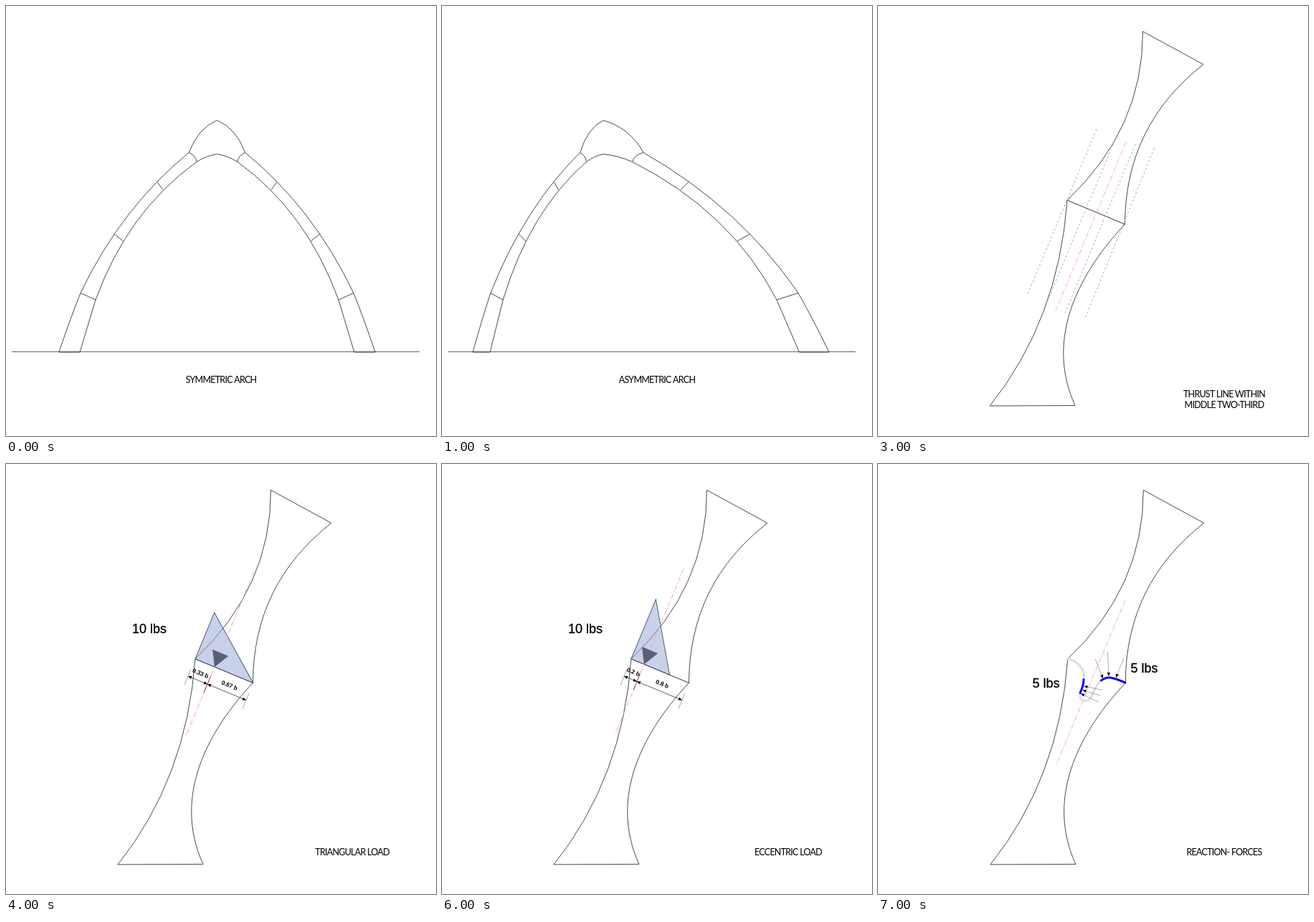
Recreate the animation shown at these times as an HTML page with a canvas. Size 600 by 600 pixels, loop 8000 ms.

```html
<!DOCTYPE html>
<html lang="en">
<head>
<meta charset="utf-8">
<title>Arch joints</title>
<style>
  html, body { margin: 0; width: 100%; height: 100%; overflow: hidden; background: #fff; }
  canvas { display: block; width: 600px; height: 600px; }
</style>
</head>
<body>
<canvas id="stage" width="600" height="600"></canvas>
<script>
const ctx = document.getElementById('stage').getContext('2d');
const INK = '#1c1c1c', PINK = '#f5a0a8', BLUE = '#0808f0';
const THRUST_DASH = [7, 2, 1.5, 2];
const HOLD = 1000;

function stroke(d, color = INK, width = 0.8, dash = []) {
  ctx.strokeStyle = color;
  ctx.lineWidth = width;
  ctx.setLineDash(dash);
  ctx.stroke(typeof d === 'string' ? new Path2D(d) : d);
  ctx.setLineDash([]);
}

function fill(d, color) {
  ctx.fillStyle = color;
  ctx.fill(new Path2D(d));
}

function caption(lines, x, y, leading) {
  ctx.font = '12.5px Lato, sans-serif';
  ctx.letterSpacing = '-0.75px';
  ctx.textAlign = 'center';
  ctx.fillStyle = '#000';
  lines.forEach((line, i) => ctx.fillText(line, x, y + i * leading));
  ctx.letterSpacing = '0px';
}

const archCaption = (...lines) => caption(lines, 300, 526, 14);
const jointCaption = (...lines) => caption(lines, 483, 546, 15);

function weight(text, x, y) {
  ctx.font = '18px "Liberation Sans", Arial, sans-serif';
  ctx.textAlign = 'left';
  ctx.fillStyle = ctx.strokeStyle = '#000';
  ctx.lineWidth = 0.3;
  ctx.fillText(text, x, y);
  ctx.strokeText(text, x, y);
}

function arrow(x1, y1, x2, y2, color = '#888') {
  stroke(`M${x1} ${y1}L${x2} ${y2}`, color, 0.7);
  ctx.save();
  ctx.translate(x2, y2);
  ctx.rotate(Math.atan2(y2 - y1, x2 - x1));
  fill('M0 0L-5 -2.2V2.2Z', '#000');
  ctx.restore();
}

function ground() {
  stroke('M8 482.5H577', '#555', 0.9);
}

// Half of the pointed arch, measured outward from its apex.
const halfArch = new Path2D(`
  M0 159.5Q26 170 39.3 204.5Q134 282 190.5 400.5Q204 434 220.7 483H191.5
  L169.5 410Q124.7 286.8 28.5 217.5Q14 208.5 0 206.7
  M39.3 204.5Q30 208 28.5 217.5
  M83.5 245.5L75.5 256.5M143.5 318L131 328M190.5 400.5L169.5 410`);

function pointedArch(apex, left, right) {
  ground();
  for (const scale of [-left, right]) {
    const half = new Path2D();
    half.addPath(halfArch, new DOMMatrix([scale, 0, 0, 1, apex, 0]));
    stroke(half);
  }
}

function boneArch() {
  ground();
  stroke(`M32 483Q58 444 64 396.5Q94 365 96 325Q126 300 139 262Q172 245 185 207
    C191 188 206 180 220 180C238 180 251 188 261 197.5
    Q292 214 324 226.5Q344 251 380 267.5Q398 296 431 319.5Q448 355 485 383Q492 425 532 483`);
  stroke(`M32 483H67Q50 444 88 406.5Q88 366 121 339Q126 296 159 278Q168 236 206 231.5
    Q228 231 255 218.5Q296 212 314 243Q348 247 368 282Q402 296 416 331
    Q447 352 460 398Q499 433 495 483H532`);
  stroke(`M185 207L206 231.5M139 262L159 278M96 325L121 339M64 396.5L88 406.5
    M261 197.5L255 218.5M324 226.5L314 243M380 267.5L368 282M431 319.5L416 331M485 383L460 398`);
}

function bones(dx, dy, straightJoint) {
  ctx.save();
  ctx.translate(dx, dy);
  stroke(`M264 271Q370 171 369.5 35.5L454 81.5Q345 166.5 344.5 304.5
    C284 369 231 461 275 557.5L156 558Q252 438 264 271`);
  if (straightJoint) stroke('M264 271L344.5 304.5', INK, 0.9);
  ctx.restore();
}

function middleThird() {
  bones(0, 0, true);
  const guide = '#999';
  for (const d of ['M305 172L208 404', 'M328 193L235 415', 'M359 193L260 431', 'M385.5 198L289 436'])
    stroke(d, guide, 0.8, [3, 3]);
  stroke('M346 190L248 425', PINK, 0.9, THRUST_DASH);
}

// Load drawn in the joint's own axes: u along the joint, v across it.
function loadCase(shape, thrust, labels) {
  const span = 87.5, dim = 26;
  bones(0, 0.9, true);
  ctx.save();
  ctx.translate(264, 272);
  ctx.rotate(Math.atan2(33.5, 81));
  fill(shape, 'rgba(148,164,210,0.5)');
  stroke(shape, '#4a5068', 0.9);
  stroke(`M${thrust} -144V106.5`, PINK, 0.9, THRUST_DASH);
  fill(`M${thrust} 0l-12 -21.5h24Z`, '#586078');

  stroke(`M0 15.5V39M${span} 15.5V39`, '#999', 0.8);
  stroke(`M${thrust} 14V39`, '#a8303c', 0.9);
  const parts = [[0, thrust], [thrust, span]];
  parts.forEach(([a, b], i) => {
    const mid = (a + b) / 2;
    arrow(mid, dim, a, dim, '#333');
    arrow(mid, dim, b, dim, '#333');
    ctx.font = 'bold 8.3px "Liberation Sans", Arial, sans-serif';
    ctx.textAlign = 'center';
    ctx.fillStyle = '#000';
    ctx.fillText(labels[i], mid, 18.5);
  });
  ctx.restore();
}

function reactions() {
  bones(0.8, 0.9, false);
  stroke('M345 190L248 421', PINK, 0.9, THRUST_DASH);
  ctx.lineCap = 'round';
  stroke('M265 272C280 275 289 287 287 300M282 320C280 331 293 335 298 324C301 316 305 308 311 302', '#dcdcdc', 3);
  stroke('M287 300.5Q287 309 282 319.5M311.5 302C321 295 328 298 345 305', BLUE, 3);
  ctx.lineCap = 'butt';
  arrow(303, 272, 314, 299);
  arrow(320.5, 262, 322, 296);
  arrow(343, 271, 332, 298);
  arrow(313, 315.5, 287.5, 310);
  arrow(310, 323, 285.5, 315.5);
  arrow(308, 332, 283, 320.5);
  weight('5 lbs', 215.5, 312);
  weight('5 lbs', 352.5, 291);
}

const scenes = [
  () => { pointedArch(294.5, 1, 1); archCaption('SYMMETRIC ARCH'); },
  () => { pointedArch(225, 0.825, 1.428); archCaption('ASYMMETRIC ARCH'); },
  () => { boneArch(); archCaption('MAXIMIZE JOINT', 'SURFACE AREA'); },
  () => { middleThird(); jointCaption('THRUST LINE WITHIN', 'MIDDLE TWO-THIRD'); },
  () => {
    loadCase('M0 0V-70L87.5 0Z', 29.2, ['0.33 b', '0.67 b']);
    weight('10 lbs', 176, 236);
    jointCaption('TRIANGULAR LOAD');
  },
  () => {
    loadCase('M0 0V-35H87.5V0Z', 43.75, ['0.5 b', '0.5 b']);
    weight('10 lbs', 268.5, 181);
    jointCaption('UNIFORMLY', 'DISTRIBUTED LOAD');
  },
  () => {
    loadCase('M0 0V-90L58 0Z', 19.4, ['0.2 b', '0.8 b']);
    weight('10 lbs', 176, 236);
    jointCaption('ECCENTRIC LOAD');
  },
  () => { reactions(); jointCaption('REACTION- FORCES'); },
];

function frame() {
  const index = Math.floor(performance.now() / HOLD) % scenes.length;
  ctx.fillStyle = '#fff';
  ctx.fillRect(0, 0, 600, 600);
  scenes[index]();
  requestAnimationFrame(frame);
}
frame();
</script>
</body>
</html>
```
